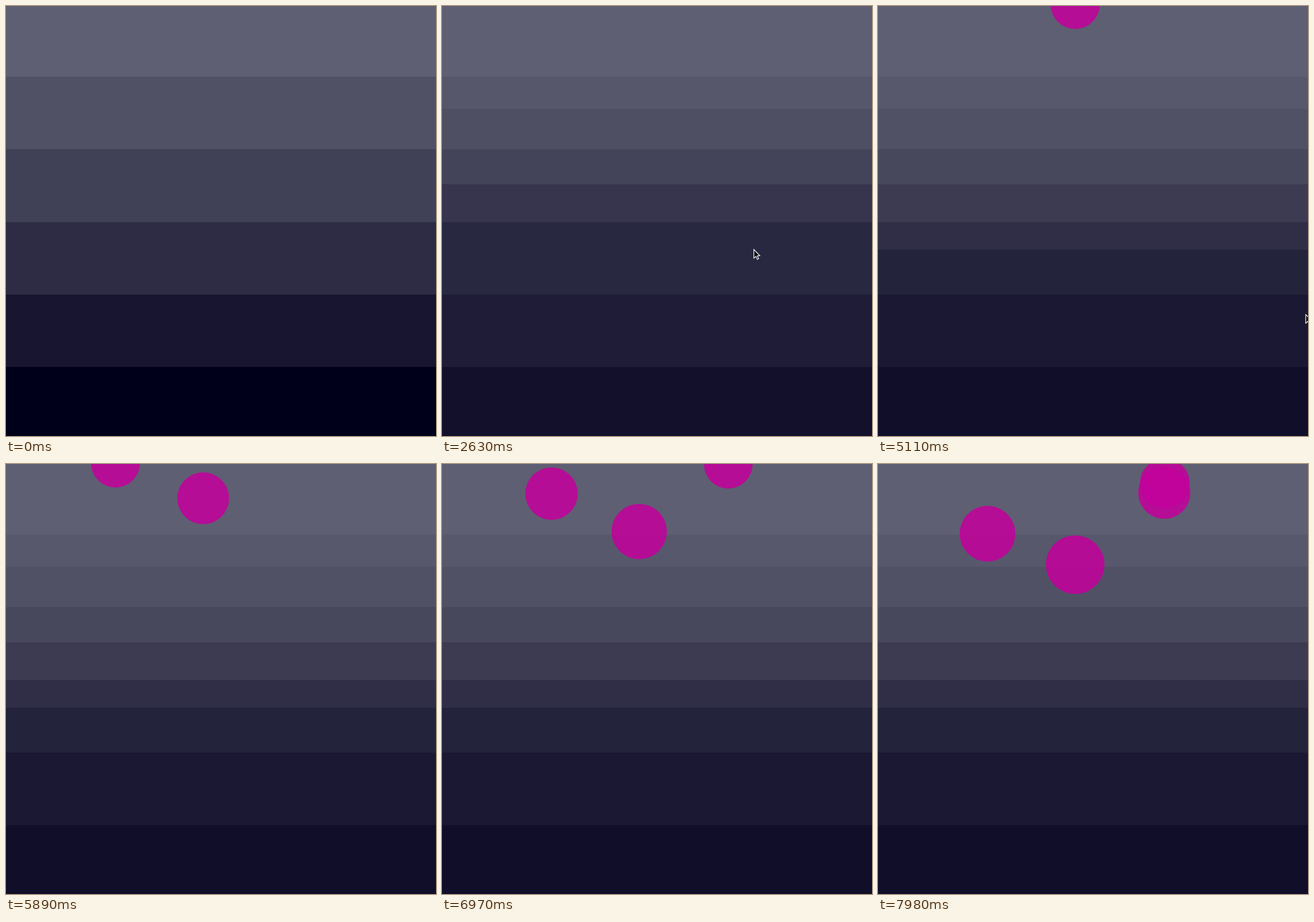
Recreate the animation shown at these times as an HTML page with a canvas. Size 748x748 px, loop 8000 ms.

```html
<!DOCTYPE html>
<html lang="en">
<head>
<meta charset="utf-8">
<title>Bouncing balls</title>
<style>
html, body { margin: 0; height: 100%; overflow: hidden; background: #000; }
canvas { display: block; }
</style>
</head>
<body>
<canvas id="stage" width="748" height="748"></canvas>
<script>
const ctx = document.getElementById('stage').getContext('2d');
const SIZE = 748, LOOP = 8000;

// Evenly spaced lines; each click adds one more and respreads the shades.
const evenLines = Array.from({ length: 5 }, (_, i) => Math.round(123 + 126.3 * i));
const clicks = [{ at: 1050, y: 179 }, { at: 2160, y: 310 }, { at: 3100, y: 424 }];
// Darkness at the top, at one and two thirds of the bars, and at the bottom
const shades = [[0, 23, 56, 94], [0, 19, 48, 74], [0, 18, 49, 76], [0, 18, 51, 78]];

// Pointer legs: start, end, x, y
const legs = [
  [0, 360, 746, 200], [360, 780, 587, 178], [1050, 1530, 553.5, 309.5],
  [2160, 2630, 542.5, 423.5], [3920, 4010, 577.5, 442.5], [4010, 5150, 750, 540]
];
const arrow = new Path2D('M0 0V15.2L3.5 11.9 5.9 17.3 8.3 16.3 6 11H10.4Z');

// All balls follow the same path, starting later.
const balls = [{ x: 343, delay: 0 }, { x: 190.5, delay: 885 },
  { x: 498, delay: 1985 }, { x: 499, delay: 2650 }];
const GRAVITY = .0011, REBOUND = .43, CONTACT = 60, FIRST_HIT = 4617, FIRST_SPEED = .58;

const ascending = (a, b) => a - b;

function linesAt(t) {
  const added = clicks.filter(c => c.at <= t).map(c => c.y);
  return [...evenLines, ...added].sort(ascending);
}

function along(keys, u) {
  const p = u * (keys.length - 1), i = Math.min(Math.floor(p), keys.length - 2);
  return keys[i] + (keys[i + 1] - keys[i]) * (p - i);
}

function drawBars(t) {
  const tops = [0, ...linesAt(t)];
  const keys = shades[tops.length - 6];
  tops.forEach((y, i) => {
    const dark = along(keys, i / (tops.length - 1));
    ctx.fillStyle = `rgb(${94 - dark}, ${95 - 1.04 * dark}, ${114 - .93 * dark})`;
    ctx.fillRect(0, y, SIZE, SIZE - y);
  });
}

function drawPointer(t) {
  let x = SIZE + 10, y = 200;
  for (const [start, end, toX, toY] of legs) {
    const k = Math.min(1, Math.max(0, (t - start) / (end - start)));
    x += (toX - x) * k;
    y += (toY - y) * k;
  }
  ctx.save();
  ctx.translate(x, y);
  ctx.fillStyle = '#080808';
  ctx.strokeStyle = '#fff';
  ctx.lineWidth = 1.2;
  ctx.fill(arrow);
  ctx.stroke(arrow);
  ctx.restore();
}

// Underside and squash of a ball that rebounds from each line in turn
function bounce(age) {
  const floors = linesAt(LOOP);
  let s = age - FIRST_HIT;
  if (s < 0) return [floors[0] + FIRST_SPEED * s + GRAVITY * s * s / 2 * -1, 1];
  for (let i = 0; ; i++) {
    if (s < CONTACT) return [floors[i], .57];
    s -= CONTACT;
    const drop = floors[i + 1] - floors[i];
    const flight = (REBOUND + Math.sqrt(REBOUND ** 2 + 2 * GRAVITY * drop)) / GRAVITY;
    if (s < flight) return [floors[i] - REBOUND * s + GRAVITY * s * s / 2, 1];
    s -= flight;
  }
}

function drawBall(t, { x, delay }) {
  const age = t - delay;
  if (age < 4300) return;
  const r = 45 + (age - 5890) * .00285;
  const [bottom, squash] = bounce(age);
  ctx.fillStyle = 'rgba(196, 0, 156, .86)';
  ctx.beginPath();
  ctx.ellipse(x, bottom - r * squash, r, r * squash, 0, 0, 2 * Math.PI);
  ctx.fill();
}

function frame() {
  const t = performance.now() % LOOP;
  drawBars(t);
  balls.forEach(ball => drawBall(t, ball));
  drawPointer(t);
  requestAnimationFrame(frame);
}
frame();
</script>
</body>
</html>
```
